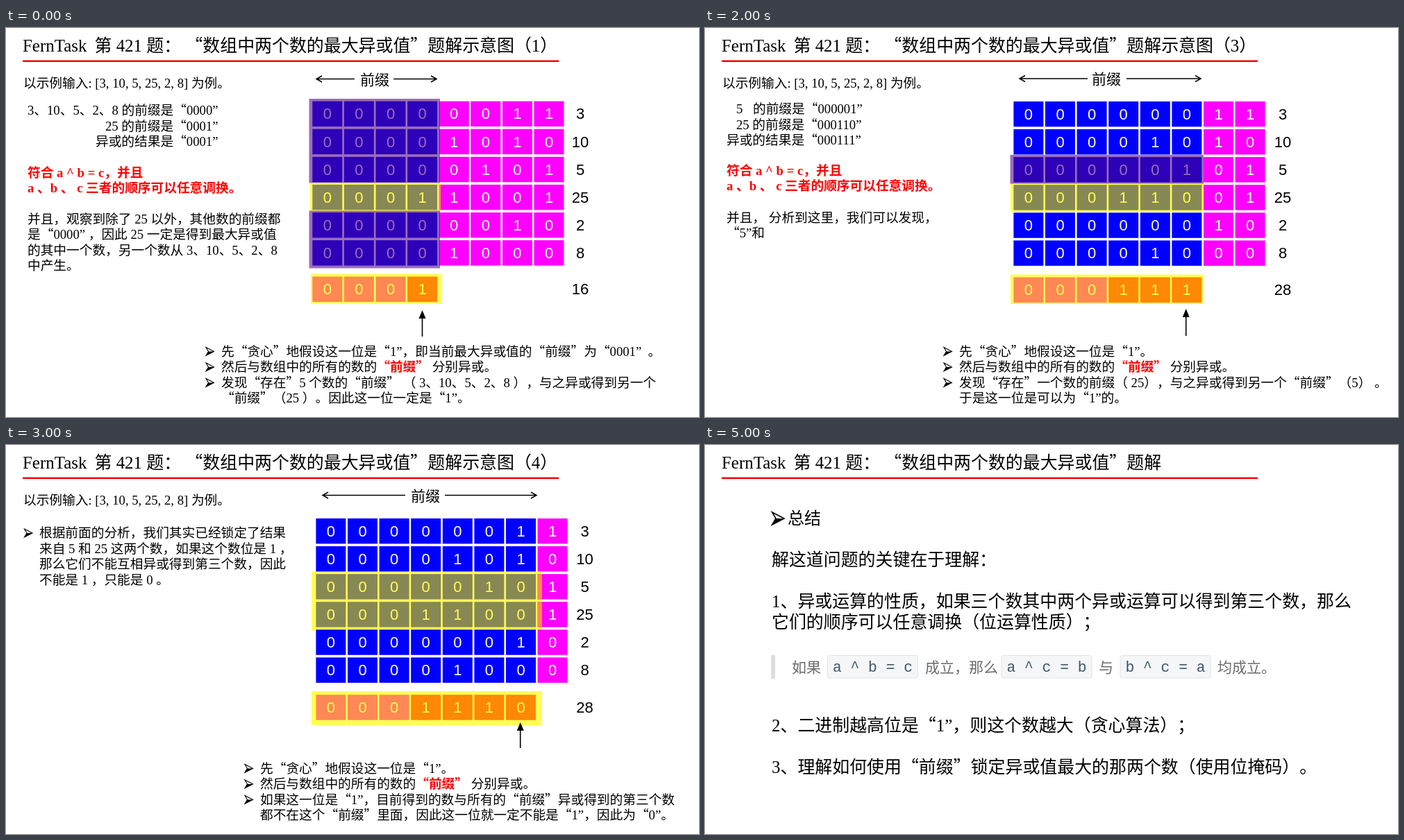
Write an HTML page that moves like this. It is 998 px wide and 561 px high and loops after 6000 ms.

```html
<!DOCTYPE html>
<html lang="zh-CN">
<head>
<meta charset="utf-8">
<title>最大异或值</title>
<style>
  html, body { margin: 0; width: 100%; height: 100%; overflow: hidden; background: #fff; }
  svg { display: block; width: 100%; height: 100%; }
  text {
    font-family: "Liberation Serif", "Noto Sans CJK SC", "Noto Sans CJK", serif;
    text-spacing-trim: space-all;
    white-space: pre;
  }
  .quote, .cjk { font-family: "Noto Sans CJK SC", "Noto Sans CJK", sans-serif; }
  .red { fill: #f00; font-weight: bold; }
  .num { font-family: "Liberation Sans", Arial, sans-serif; text-anchor: middle; }
  .code { font-family: "Liberation Mono", monospace; fill: #3f566b; }
  .note { fill: #6b6b6b; }
  .slide { visibility: hidden; animation: show 6s step-end infinite; }
  @keyframes show {
    0% { visibility: visible; }
    16.6666%, 100% { visibility: hidden; }
  }
</style>
</head>
<body>
<svg id="stage" viewBox="0 0 998 561" xmlns="http://www.w3.org/2000/svg"></svg>
<script>
const NUMBERS = [3, 10, 5, 25, 2, 8];
const BODY = 18.7, HEAD = 24.93, LEADING = 22.4;
const CELL_W = 43, CELL_H = 36.5, COL = 45.6, ROW = 40.1;
const BLUE = '#00f', PINK = '#f0f', YELLOW = '#ffff55', OLIVE = '#888855',
      SALMON = '#ff8855', ORANGE = '#ff8806', PURPLE = 'rgba(82,0,132,.57)';

const bits = n => n.toString(2).padStart(8, '0');
const rect = (x, y, w, h, fill, extra = '') =>
  `<rect x="${x}" y="${y}" width="${w}" height="${h}" fill="${fill}" ${extra}/>`;

// Quotes are full width, except a closing one after a digit; *...* marks emphasis.
const markup = s => s
  .replace(/“|(?<!\d)”/g, '<tspan class="quote">$&</tspan>')
  .replace(/\*(.+?)\*/g, '<tspan class="red">$1</tspan>');
const text = (x, y, s, size = BODY, cls = '', fill = '') =>
  `<text x="${x}" y="${y}" font-size="${size}" class="${cls}"${fill && ` fill="${fill}"`}>${markup(s)}</text>`;
const lines = (x, y, list, cls) =>
  list.map((s, i) => text(x, y + i * LEADING, s, BODY, cls)).join('');

const bullet = (x, y, k = 1) =>
  `<g transform="translate(${x} ${y}) scale(${k})"><path d="M.5-6L12 0L.5 6L4 0Z" fill="#fff" stroke="#000" stroke-width="1.1"/>
   <path d="M4 0H12L.5 6Z"/></g>`;

const title = part =>
  text(24, 34, 'FernTask', HEAD) +
  text(127.5, 34, `第 421 题： “数组中两个数的最大异或值”题解${part ? `示意图（${part}）` : ''}`, HEAD) +
  rect(24, 46.5, 772, 2.5, '#f00');

const sideArrow = (from, to, y) => {
  const back = to + Math.sign(from - to) * 8;
  return `<path d="M${from} ${y}H${to}M${back} ${y - 4.5}L${to} ${y}L${back} ${y + 4.5}" fill="none" stroke="#000" stroke-width="1.5"/>`;
};
const upArrow = (x, tip, tail) =>
  `<path d="M${x} ${tail}V${tip + 8}" stroke="#000" stroke-width="1.6"/>
   <path d="M${x} ${tip}l5 12h-10Z"/>`;

const prefixHeader = ({ y, left, right, labelX, label = '前缀' }) =>
  sideArrow(...left, y) + sideArrow(...right, y) + text(labelX, y + 8, label, 21, 'cjk');

function grid({ n, x, top, resultTop, labelX, result, yellowRows, rowBox, resultBox, purple = [] }) {
  const cell = (c, y, bit, fill, ink) =>
    rect(x + c * COL, y, CELL_W, CELL_H, fill) +
    text(x + c * COL + CELL_W / 2, y + 25.8, bit, 22, 'num', ink);
  const label = (y, value) => text(labelX, y + 25.8, String(value), 22, 'num');
  const next = x + n * COL, spill = rowBox[0] + rowBox[2] - next;
  let out = rect(...rowBox, YELLOW) + rect(...resultBox, YELLOW);

  NUMBERS.forEach((value, r) => {
    const y = top + r * ROW, lit = yellowRows.includes(r);
    [...bits(value)].forEach((bit, c) => {
      const inside = c < n;
      out += cell(c, y, bit, inside ? (lit ? OLIVE : BLUE) : PINK, inside && lit ? YELLOW : '#fff');
    });
    if (lit && n < 8 && spill > 0) out += rect(next, y, spill, CELL_H, SALMON);
    out += label(y, value);
  });

  [...bits(result).slice(0, n)].forEach((bit, c) => {
    out += cell(c, resultTop, bit, c < 3 ? SALMON : ORANGE, YELLOW);
  });
  return out + label(resultTop, result) + purple.map(box => rect(...box, PURPLE)).join('');
}

const intro = text(25, 86, '以示例输入: [3, 10, 5, 25, 2, 8] 为例。');
const rule = y => lines(31, y, ['符合 a ^ b = c，并且', 'a 、b 、 c 三者的顺序可以任意调换。'], 'red');
const compare = '然后与数组中的所有的数的*“前缀”* 分别异或。';
const steps = (x, first, third, fourth) =>
  [466.5, 489, 511.5].map(y => bullet(x, y)).join('') +
  lines(x + 22.5, 473, [first, compare, third, fourth]);

const locked = bullet(26, 127) + lines(48, 133.3, [
  '根据前面的分析，我们其实已经锁定了结果',
  '来自 5 和 25 这两个数，如果这个数位是 1 ，',
  '那么它们不能互相异或得到第三个数，因此',
  '不能是 1 ，只能是 0 。']);
const guess = '先“贪心”地假设这一位是“1”。';
const rejected = steps(343.5, guess,
  '如果这一位是“1”，目前得到的数与所有的“前缀”异或得到的第三个数',
  '都不在这个“前缀”里面，因此这一位就一定不能是“1”，因此为“0”。');

const slides = [
  title(1) + intro +
  text(31, 125.3, '3、10、5、2、8 的前缀是“0000”') +
  text(143, 147.7, '25 的前缀是“0001”') +
  text(129, 170, '异或的结果是“0001”') +
  rule(215) +
  lines(31, 282, [
    '并且，观察到除了 25 以外，其他数的前缀都',
    '是“0000” ，因此 25 一定是得到最大异或值',
    '的其中一个数，另一个数从 3、10、5、2、8',
    '中产生。']) +
  prefixHeader({ y: 73.5, left: [502, 447], right: [558, 620], labelX: 510 }) +
  grid({ n: 4, x: 441.3, top: 105.6, resultTop: 358.5, labelX: 827, result: 16,
    yellowRows: [3], rowBox: [438, 223.5, 188, 41], resultBox: [439, 354.5, 189, 43],
    purple: [[436.5, 102, 188.5, 121.5], [436.5, 263.5, 188.5, 83]] }) +
  upArrow(599.5, 407, 445) +
  steps(287.5, '先“贪心”地假设这一位是“1”，即当前最大异或值的“前缀”为“0001”  。',
    '发现“存在”5 个数的“前缀” （ 3、10、5、2、8 ），与之异或得到另一个',
    '“前缀”（25 ）。因此这一位一定是“1”。'),

  title(2) + intro +
  text(31, 124.3, '3、5、2 的前缀是“00000”') +
  text(77, 146.7, '25 的前缀是“00011”') +
  text(64, 169, '异或的结果是“00011”') +
  rule(214) +
  lines(31, 281, ['由前面的分析，25 一定是得到最大异或值的', '其中一个数，另一个数从 3、5、2中产生。']) +
  prefixHeader({ y: 73.5, left: [527, 453], right: [585, 668], labelX: 535 }) +
  grid({ n: 5, x: 443.7, top: 105.6, resultTop: 358.5, labelX: 830, result: 24,
    yellowRows: [3], rowBox: [440, 224, 231, 41], resultBox: [440, 355, 231, 42.5],
    purple: [102, 183, 264].map(y => [439.5, y, 231.5, 41.5]) }) +
  upArrow(647, 407, 445) +
  steps(287.5, '先“贪心”地假设这一位是“1”，即当前最大异或值的“前缀”为“00011”  。',
    '发现“存在”三个数的“前缀” （3，5，2），与之异或得到另一个“前缀”',
    '（25） 。于是这一位是可以为“1”的。'),

  title(3) + intro +
  text(45, 123.3, '5') + text(69, 123.3, '的前缀是“000001”') +
  text(45, 145.7, '25 的前缀是“000110”') +
  text(31, 168, '异或的结果是“000111”') +
  rule(212) +
  lines(31, 279.5, ['并且， 分析到这里，我们可以发现，', '“5”和']) +
  prefixHeader({ y: 73, left: [551, 453], right: [607, 714], labelX: 557 }) +
  grid({ n: 6, x: 444.4, top: 105.9, resultTop: 359.5, labelX: 832, result: 28,
    yellowRows: [3], rowBox: [440, 224, 278, 41], resultBox: [440, 355.5, 278, 42.5],
    purple: [[439.5, 183, 278.5, 41.5]] }) +
  upArrow(692.7, 405, 444) +
  steps(343.5, guess,
    '发现“存在”一个数的前缀（ 25），与之异或得到另一个“前缀”（5） 。',
    '于是这一位是可以为“1”的。'),

  title(4) + intro + locked +
  prefixHeader({ y: 72.5, left: [575, 456], right: [632, 764], labelX: 583 }) +
  grid({ n: 7, x: 446.4, top: 105.9, resultTop: 360.2, labelX: 833.5, result: 28,
    yellowRows: [2, 3], rowBox: [440, 182.5, 332, 85], resultBox: [440, 355, 332, 49] }) +
  upArrow(740.7, 400, 437) + rejected,

  title(5) + intro + locked +
  prefixHeader({ y: 71.8, left: [534, 453], right: [718, 809], labelX: 541, label: '前缀（全部看完）' }) +
  grid({ n: 8, x: 445.4, top: 104.8, resultTop: 359.2, labelX: 832.7, result: 28,
    yellowRows: [2, 3], rowBox: [440, 182, 377, 85], resultBox: [440, 355, 377, 49] }) +
  upArrow(783, 400, 436) + rejected,

  title() + bullet(96, 106, 1.5) + text(119, 114, '总结', 24) +
  text(96, 174, '解这道问题的关键在于理解：', HEAD) +
  text(96, 233.7, '1、异或运算的性质，如果三个数其中两个异或运算可以得到第三个数，那么', HEAD) +
  text(96, 263.7, '它们的顺序可以任意调换（位运算性质）；', HEAD) +
  rect(95, 303, 6, 34, '#ddd') +
  [[125, '如果'], [317, '成立，那么'], [567, '与'], [738, '均成立。']]
    .map(([x, s]) => text(x, 327.7, s, 21, 'cjk note')).join('') +
  [[176.5, 'a ^ b = c'], [427, 'a ^ c = b'], [598, 'b ^ c = a']]
    .map(([x, s]) => rect(x, 303.5, 130, 32.5, '#f4f6f8', 'rx="3" stroke="#dfe4e8"') +
      text(x + 7.5, 327.3, s, 21.3, 'code')).join('') +
  text(96, 413, '2、二进制越高位是“1”，则这个数越大（贪心算法）；', HEAD) +
  text(96, 473, '3、理解如何使用“前缀”锁定异或值最大的那两个数（使用位掩码）。', HEAD)
];

document.getElementById('stage').innerHTML = slides.map((content, i) =>
  `<g class="slide" style="animation-delay:${i && i - 6}s">${content}</g>`).join('');
</script>
</body>
</html>
```
